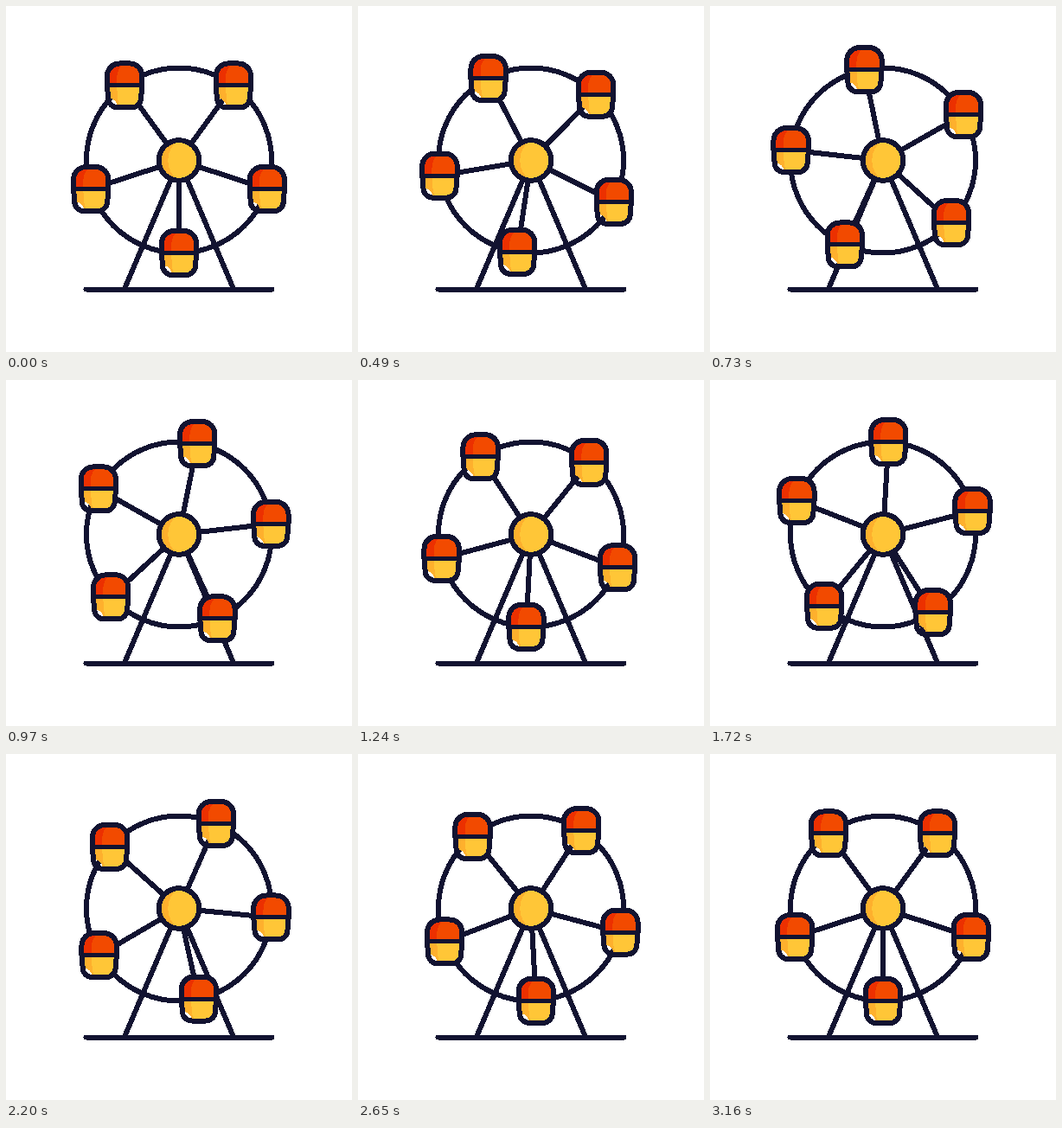
Write an HTML page that moves like this. It is 400 px wide and 400 px high and loops after 3.22 s.

```html
<!DOCTYPE html>
<html lang="en">
<head>
<meta charset="utf-8">
<title>Ferris wheel</title>
<style>
  html, body { margin: 0; width: 100%; height: 100%; overflow: hidden; background: #fff; }
  svg { display: block; width: 100%; height: 100%; shape-rendering: crispEdges; }
  .line { fill: none; stroke: #121331; stroke-width: 6; stroke-linecap: round; stroke-linejoin: round; }
  .bar { stroke-width: 5; }
  .red { fill: #f24a00; }
  .dark-red { fill: #ec3000; }
  .yellow { fill: #ffc637; }
  .dark-yellow { fill: #feb02d; }
</style>
</head>
<body>
<svg viewBox="0 0 400 400">
  <defs>
    <g id="cabin">
      <path class="dark-red" d="M-20.2 0V-11A14.5 14.5 0 0 1-5.7-25.5H5.7A14.5 14.5 0 0 1 20.2-11V0Z"/>
      <path class="red" d="M-9 0V-9C-9-17-5-24 1-25.5H5.7A14.5 14.5 0 0 1 20.2-11V0Z"/>
      <path class="dark-yellow" d="M-20.2 0L-19 14.5A11 11 0 0 1-8 25.5H8A11 11 0 0 0 19 14.5L20.2 0Z"/>
      <path class="yellow" d="M-9 0L-8 15C-7.6 21-5 25.5-1 25.5H8A11 11 0 0 0 19 14.5L20.2 0Z"/>
      <path class="line" d="M-20.2 0V-11A14.5 14.5 0 0 1-5.7-25.5H5.7A14.5 14.5 0 0 1 20.2-11V0L19 14.5A11 11 0 0 1 8 25.5H-8A11 11 0 0 1-19 14.5Z"/>
      <path class="line bar" d="M-20 0H20"/>
    </g>
  </defs>
  <circle class="line" cx="200" cy="178.5" r="107"/>
  <path class="line" d="M137 327L200 178.5L263 327M92.5 327.5H307.5"/>
  <path class="line" id="spokes"/>
  <circle class="dark-yellow" cx="200" cy="178.5" r="23.3"/>
  <path class="yellow" d="M200 155.2A23.3 23.3 0 0 1 200 201.8C183 192 183 165 200 155.2"/>
  <circle class="line" cx="200" cy="178.5" r="23.3"/>
  <g id="cabins"></g>
</svg>
<script>
  const LOOP = 3220, HOLD = 130, STEP = 30, STEPS = 102;
  const CX = 200, CY = 178.5, RADIUS = 107, TURN = 144;
  const spokes = document.getElementById('spokes');
  const group = document.getElementById('cabins');
  const cabins = Array.from({ length: 5 }, () => {
    const use = document.createElementNS('http://www.w3.org/2000/svg', 'use');
    use.setAttribute('href', '#cabin');
    return group.appendChild(use);
  });

  // cubic-bezier(1/3, 0, 0.3, 1), solved by bisection
  function ease(x) {
    let lo = 0, hi = 1;
    for (let i = 0; i < 30; i++) {
      const s = (lo + hi) / 2, r = 1 - s;
      if (s * r * r + 0.9 * s * s * r + s * s * s < x) lo = s; else hi = s;
    }
    return lo * lo * (3 - 2 * lo);
  }

  function draw(t) {
    const step = t < HOLD ? 0 : Math.min(STEPS, 1 + Math.floor((t - HOLD) / STEP));
    const turn = TURN * ease(step / STEPS);
    let d = '';
    cabins.forEach((cabin, i) => {
      const a = (90 + 72 * i + turn) * Math.PI / 180;
      const x = CX + RADIUS * Math.cos(a), y = CY + RADIUS * Math.sin(a);
      cabin.setAttribute('transform', `translate(${x} ${y})`);
      d += `M${CX} ${CY}L${x} ${y}`;
    });
    spokes.setAttribute('d', d);
  }

  const start = performance.now();
  function tick() {
    draw((performance.now() - start) % LOOP);
    requestAnimationFrame(tick);
  }
  tick();
</script>
</body>
</html>
```
